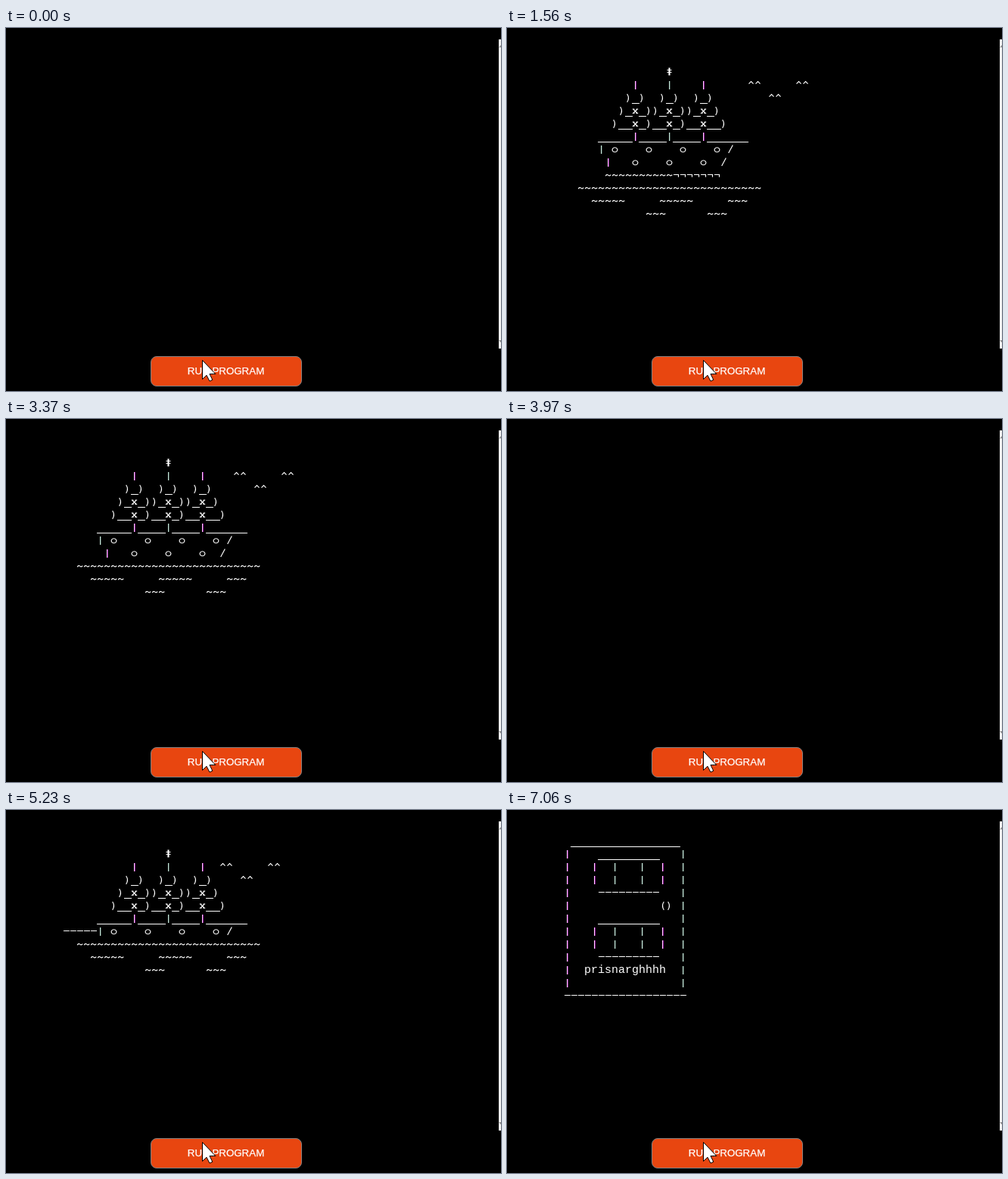
An HTML page that plays this animation: 654x479 px, repeating every 8 s.

```html
<!DOCTYPE html>
<html lang="en">
<head>
<meta charset="utf-8">
<title>Run program</title>
<style>
  html, body { margin: 0; width: 100%; height: 100%; overflow: hidden; background: #000; }
  svg { display: block; width: 100%; height: 100%; }
  #screen text { font: 15px "Liberation Mono", monospace; fill: #fff; white-space: pre; }
  .line { fill: none; stroke: #fff; stroke-width: 1.15; }
  .label { font: 13.333px "Liberation Sans", sans-serif; fill: #fff; stroke: #fff; stroke-width: .25; }
</style>
</head>
<body>
<svg viewBox="0 0 654 479">
  <rect width="654" height="479"/>
  <g id="screen"></g>
  <g id="scrollbar">
    <rect x="651" y="15" width="3" height="408" fill="#f4f4f4"/>
    <path d="M651 25.500l3-3v3zM651 412l3 3v-3z" fill="#8a8a8a"/>
  </g>
  <rect x="191.500" y="433.500" width="199" height="39" rx="7.500" fill="#e84610" stroke="#808080"/>
  <text class="label" x="239.800" y="457">RUN PROGRAM</text>
  <path d="M259.500 438.500V463.500L265 458.200L269 466L272.800 464.300L269 456.500H276.800Z"
        fill="#fff" stroke="#000"/>
</svg>
<script>
const LOOP = 8000, LEFT = 3, CELL = 9, ROW = 17, BASE = 62;
const screen = document.getElementById('screen');

function add(parent, tag, attrs, text) {
  const el = document.createElementNS('http://www.w3.org/2000/svg', tag);
  for (const key in attrs) el.setAttribute(key, attrs[key]);
  if (text) el.textContent = text;
  return parent.appendChild(el);
}

const colX = col => LEFT + CELL * col;
const box = (g, x, y, width, height, fill = '#fff') =>
  add(g, 'rect', { x, y, width, height, fill, 'shape-rendering': 'crispEdges' });

// Thin terminal glyphs, relative to the cell's left edge and baseline
const strokes = {
  '~': 'M1.200-2.800Q3-5.500 4.700-3.800T8.300-4.300',
  '^': 'M1.500-5.300L4.500-8.500L7.500-5.300',
  '¬': 'M1-4.500H7.500V-1.300',
  '(': 'M6.300-9Q2.700-3.500 6.300 2',
  ')': 'M2.700-9Q6.300-3.500 2.700 2',
  '/': 'M7.300-9.500L1.700 1',
  '#': 'M4-9.500V.5M5-9.500V.5M1.500-6.500H7.500M1.500-3.500H7.500',
  'x': 'M1.800-6L7.200-.5M7.200-6L1.800-.5M.8-6H3.400M5.600-6H8.200M.8-.5H3.600M5.400-.5H8.200',
  'o': 'M4.500-6.300a3.400 3 0 1 0 .01 0z',
};

function glyph(g, ch, col, base) {
  const x = colX(col);
  if (ch === '_') box(g, x, base + 3, CELL + 1, 1);
  else if (ch === '-') box(g, x + 1, base - 5, CELL - 1, 1);
  else if (ch === '|') {
    // subpixel tint alternates with the column
    const [main, fringe] = col % 2 ? ['#c6e6da', '#3c4c46'] : ['#ffd2ff', '#8c1496'];
    box(g, x + 4, base - 9, 1, 11, main);
    box(g, x + 5, base - 9, 1, 11, fringe);
  } else if (strokes[ch]) {
    add(g, 'path', { class: 'line', d: strokes[ch], transform: `translate(${x} ${base})` });
  }
}

function put(g, row, col, str) {
  const base = BASE + ROW * row;
  if (/^[a-z]{2,}$/.test(str)) add(g, 'text', { x: colX(col), y: base }, str);
  else [...str].forEach((ch, i) => glyph(g, ch, col + i, base));
}

const hull = [
  [23, '#'],
  [18, '|    |    |'],
  [17, ')_)  )_)  )_)'],
  [16, ')_x_))_x_))_x_)'],
  [15, ')__x_)__x_)__x__)'],
  [13, '_____|____|____|______'],
  [13, '| o    o    o    o /'],
  [14, '|   o    o    o  /'],
  [14, '~'.repeat(10) + '¬'.repeat(7)],
];
const water = [
  [10, '~'.repeat(27)],
  [12, '~~~~~     ~~~~~     ~~~'],
  [20, '~~~      ~~~'],
];

// depth 0..2: the ship sinks a row and the birds drift two columns
function ship(depth) {
  const g = add(screen, 'g', {});
  const line = 9 - depth;
  hull.slice(0, line).forEach(([col, str], row) => put(g, row, col, str));
  water.forEach(([col, str], i) => put(g, line + i, col, str));
  put(g, 1, 35 - 2 * depth, '^^     ^^');
  put(g, 2, 38 - 2 * depth, '^^');
  if (depth === 2) put(g, 6, 8, '-----');
  return g;
}

function door() {
  const g = add(screen, 'g', {});
  put(g, -1, 9, '_'.repeat(16));
  for (let row = 0; row < 11; row++) put(g, row, 8, '|' + ' '.repeat(16) + '|');
  for (const top of [0, 5]) {
    put(g, top, 13, '_'.repeat(9));
    put(g, top + 1, 12, '|  |   |  |');
    put(g, top + 2, 12, '|  |   |  |');
    put(g, top + 3, 13, '-'.repeat(9));
  }
  put(g, 4, 22, '()');
  put(g, 9, 11, 'prisnarghhhh');
  put(g, 11, 8, '-'.repeat(18));
  return g;
}

const intro = '.'.repeat(17) + 'Somewhere on the high seas.';
const typing = add(screen, 'g', {});
const typed = add(typing, 'text', { x: LEFT, y: BASE });
const caret = box(typing, LEFT, 49, CELL, ROW);

const scenes = { type: typing, high: ship(0), mid: ship(1), low: ship(2), door: door() };
const schedule = [
  [0, 'type'], [1560, 'high'], [1890, 'mid'], [2220, 'low'], [2490, 'mid'],
  [2760, 'high'], [3370, 'mid'], [3700, 'low'], [3970, 'blank'], [4040, 'mid'],
  [4300, 'high'], [4900, 'mid'], [5230, 'low'], [5490, 'mid'], [5820, 'high'],
  [6070, 'blank'], [7060, 'door'],
];

function draw(t) {
  const [, current] = schedule.filter(([start]) => start <= t).pop();
  for (const name in scenes)
    scenes[name].setAttribute('display', name === current ? 'inline' : 'none');

  // three characters per tick
  const count = Math.min(intro.length, 3 * Math.floor((t + 8) / 69) - 1);
  typed.textContent = intro.slice(0, Math.max(0, count));
  caret.setAttribute('x', colX(count));
  caret.setAttribute('display', count > 0 ? 'inline' : 'none');
}

const begin = performance.now();
function tick() {
  draw((performance.now() - begin) % LOOP);
  requestAnimationFrame(tick);
}
draw(0);
requestAnimationFrame(tick);
</script>
</body>
</html>
```
